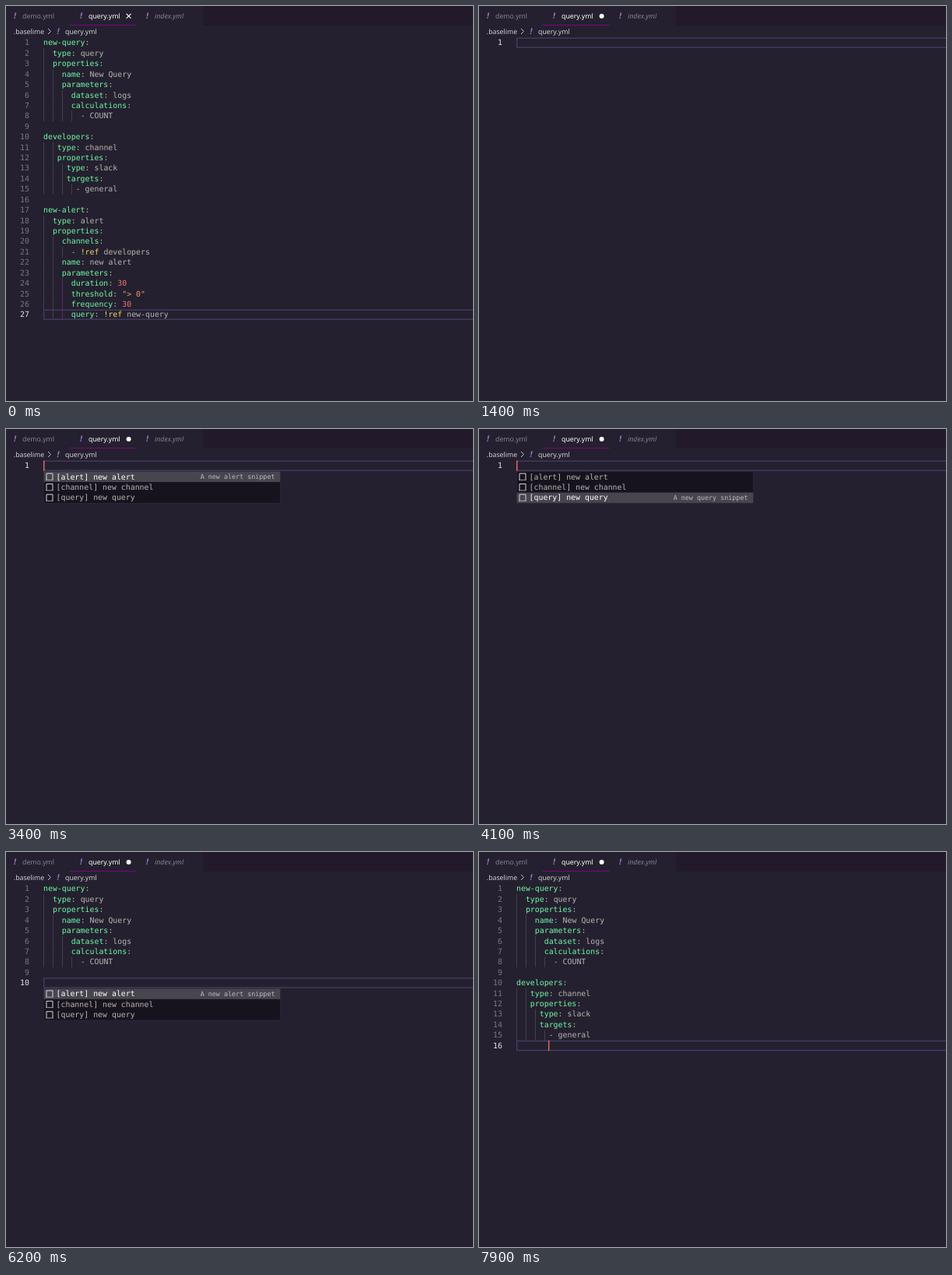
Write an HTML page that moves like this. It is 600 px wide and 507 px high and loops after 8000 ms.

```html
<!DOCTYPE html>
<html lang="en">
<head>
<meta charset="utf-8">
<title>Editor snippets</title>
<style>
  html, body { margin: 0; width: 100%; height: 100%; overflow: hidden; background: #24202f; }
  svg { display: block; width: 600px; height: 507px; }
  text { white-space: pre; text-rendering: geometricPrecision; }
  .ui { font: 8.75px "Noto Sans", "Open Sans", sans-serif; fill: #d3d0da; }
  .dim { fill: #87828f; }
  .italic { font-style: italic; }
  .bang { font: italic bold 10.5px "Noto Sans", sans-serif; fill: #a470c8; }
  .code { font: 9.89px "DejaVu Sans Mono", monospace; fill: #b9b4b0; }
  .key { fill: #70f8a4; }
  .tag { fill: #f4d95f; }
  .num { fill: #f0736f; }
  .str { fill: #f29a62; }
  .gutter { fill: #7a7586; text-anchor: end; }
  .current { fill: #e6e3ec; }
  .picked { fill: #fff; }
  .detail { font-size: 8.4px; fill: #bdbbc3; text-anchor: end; }
</style>
</head>
<body>
<svg viewBox="0 0 600 507">
  <rect width="600" height="507" fill="#24202f"/>
  <rect x="253" width="347" height="25" fill="#22192b"/>
  <rect x="81" y="24" width="87" height="1" fill="#76087f"/>
  <text class="bang" x="10" y="16.3">!</text>
  <text class="ui dim" x="21" y="15.6">demo.yml</text>
  <text class="bang" x="95" y="16.3">!</text>
  <text class="ui picked" x="106" y="15.6">query.yml</text>
  <text class="bang" x="180" y="16.3">!</text>
  <text class="ui dim italic" x="191" y="15.6">index.yml</text>
  <path id="close" d="M154.7 10l5.8 5.8m0-5.8l-5.8 5.8" stroke="#f4f2f7" stroke-width="1.1"/>
  <circle id="dirty" cx="157.6" cy="13" r="3" fill="#fff"/>
  <text class="ui" x="9.8" y="35.5">.baselime</text>
  <path d="M54 29l3.5 3.5-3.5 3.5" fill="none" stroke="#c5c2cc"/>
  <text class="bang" x="65.5" y="36.2">!</text>
  <text class="ui" x="76" y="35.5">query.yml</text>
  <g id="editor"></g>
</svg>
<script>
const LEFT = 48, TOP = 40.5, ROW = 13.423, CHAR = 5.957, BASELINE = 9.9;
const PIXEL = .7065; // one editor pixel at the zoom shown
const BLINK = 500, LOOP = 8000;

const QUERY = `new-query:
  type: query
  properties:
    name: New Query
    parameters:
      dataset: logs
      calculations:
        - COUNT`;
const CHANNEL = `developers:
   type: channel
   properties:
     type: slack
     targets:
       - general`;
const ALERT = `new-alert:
  type: alert
  properties:
    channels:
      - !ref developers
    name: new alert
    parameters:
      duration: 30
      threshold: "> 0"
      frequency: 30
      query: !ref new-query`;
const BOTH = `${QUERY}\n\n${CHANNEL}`;
const FULL = `${BOTH}\n\n${ALERT}`;
const SNIPPETS = ['alert', 'channel', 'query'];

// Each step: start time, text, caret row and column, extras.
const steps = [];
function step(at, text, row, col, extras = {}) {
  steps.push({ at, input: at, text, row, col, ...extras });
}
// Suggestion list changes keep the caret blinking in its old rhythm.
function suggest(at, pick) {
  steps.push({ ...steps[steps.length - 1], at, pick });
}

step(0, FULL, 26, 26, { input: -900, saved: true });
step(500, FULL, 26, 27, { saved: true, selected: true });
step(700, '', 0, 0);
step(1500, 'n', 0, 1, { pick: 0 });
step(1700, 'new', 0, 3, { pick: 0 });
step(1900, 'new ', 0, 4);
step(2400, 'new', 0, 3);
step(2800, 'ne', 0, 2);
step(3000, 'n', 0, 1);
step(3100, '', 0, 0);
suggest(3400, 0);
suggest(3900, 1);
suggest(4100, 2);
step(4200, QUERY, 7, 15);
step(4800, QUERY + '\n', 8, 8);
step(5000, QUERY + '\n\n', 9, 8);
step(5200, QUERY + '\n\n', 9, 6);
step(5400, QUERY + '\n\n', 9, 4);
step(5600, QUERY + '\n\n', 9, 2);
step(5700, QUERY + '\n\n', 9, 0);
suggest(6200, 0);
suggest(6700, 1);
step(7000, BOTH, 14, 16);
step(7900, BOTH + '\n', 15, 7);

const colX = col => LEFT + col * CHAR;
const rowY = row => TOP + row * ROW;
const label = (x, y, text, cls = '') => `<text class="code ${cls}" x="${x}" y="${y}">${text}</text>`;
const box = (x, y, w, h, fill) =>
  `<rect x="${x}" y="${y}" width="${w}" height="${h}" fill="${fill}"/>`;
// A rectangle whose border lies fully inside its bounds.
const frame = (x, y, w, h, border, stroke, fill = 'none') =>
  `<rect x="${x + border / 2}" y="${y + border / 2}" width="${w - border}" height="${h - border}"
    fill="${fill}" stroke="${stroke}" stroke-width="${border}"/>`;
const indentOf = line => line.search(/\S|$/);

function codeLine(line, row) {
  const token = /(?<key>[\w-]+(?=:))|(?<tag>!ref)|(?<str>".*")|(?<num>\b\d+\b)|[^\s:]+|:/g;
  return [...line.matchAll(token)].map(m => {
    const cls = Object.keys(m.groups).find(name => m.groups[name]);
    return label(colX(m.index), rowY(row) + BASELINE, m[0].replace('>', '&gt;'), cls);
  }).join('');
}

function guides(lines, caretRow) {
  const activeCol = Math.ceil(indentOf(lines[caretRow]) / 2) * 2 - 2;
  let first = caretRow, last = caretRow;
  while (first > 0 && indentOf(lines[first - 1]) > activeCol) first--;
  while (last < lines.length - 1 && indentOf(lines[last + 1]) > activeCol) last++;
  let out = '';
  lines.forEach((line, row) => {
    for (let col = 0; col < indentOf(line); col += 2) {
      const active = col === activeCol && row >= first && row <= last;
      out += box(Math.round(colX(col)), rowY(row), 1, ROW, active ? '#5c2a68' : '#433f4c');
    }
  });
  return out;
}

function suggestions(row, col, pick) {
  const x = colX(col), y = rowY(row + 1);
  let out = frame(x, y, 305, 3 * ROW + 2 * PIXEL, PIXEL, '#302b3b', '#17131e');
  SNIPPETS.forEach((name, i) => {
    const top = y + PIXEL + i * ROW, picked = i === pick;
    if (picked) out += box(x + PIXEL, top, 305 - 2 * PIXEL, ROW, '#47454e');
    out += `<path d="M${x + 4} ${top + 10.7}v-8.2h8v8.2" fill="none" stroke="#d8d6dc"/>` +
      `<path d="M${x + 3.5} ${top + 10.8}h9" stroke="#d8d6dc" stroke-dasharray="1.5 .6"/>` +
      label(x + 16.6, top + BASELINE, `[${name}] new ${name}`, picked ? 'picked' : '');
    if (picked) out += label(x + 297.5, top + 9.3, `A new ${name} snippet`, 'detail');
  });
  return out;
}

function draw({ text, row, col, pick, saved, selected }, caretOn) {
  const lines = text.split('\n');
  let out = '';
  if (selected) {
    lines.forEach((line, i) => {
      const width = (line.length + (i < lines.length - 1)) * CHAR;
      out += box(LEFT, rowY(i), width, ROW, '#403a55');
    });
  } else {
    out += frame(LEFT, rowY(row), 560, ROW, 2 * PIXEL, '#443b62');
  }
  out += guides(lines, row);
  lines.forEach((line, i) => {
    const gutter = i === row ? 'gutter current' : 'gutter';
    out += label(30, rowY(i) + BASELINE, i + 1, gutter) + codeLine(line, i);
  });
  if (caretOn) out += box(Math.floor(colX(col)), rowY(row), 2 * PIXEL, ROW, '#e2695f');
  if (pick !== undefined) out += suggestions(row, col, pick);
  document.getElementById('editor').innerHTML = out;
  document.getElementById('close').style.display = saved ? '' : 'none';
  document.getElementById('dirty').style.display = saved ? 'none' : '';
}

let shown = '';
function tick() {
  const time = performance.now() % LOOP;
  const current = steps.filter(s => s.at <= time).pop();
  const caretOn = Math.floor((time - current.input) / BLINK) % 2 === 0;
  const state = `${current.at} ${caretOn}`;
  if (state !== shown) {
    shown = state;
    draw(current, caretOn);
  }
  requestAnimationFrame(tick);
}
tick();
</script>
</body>
</html>
```
